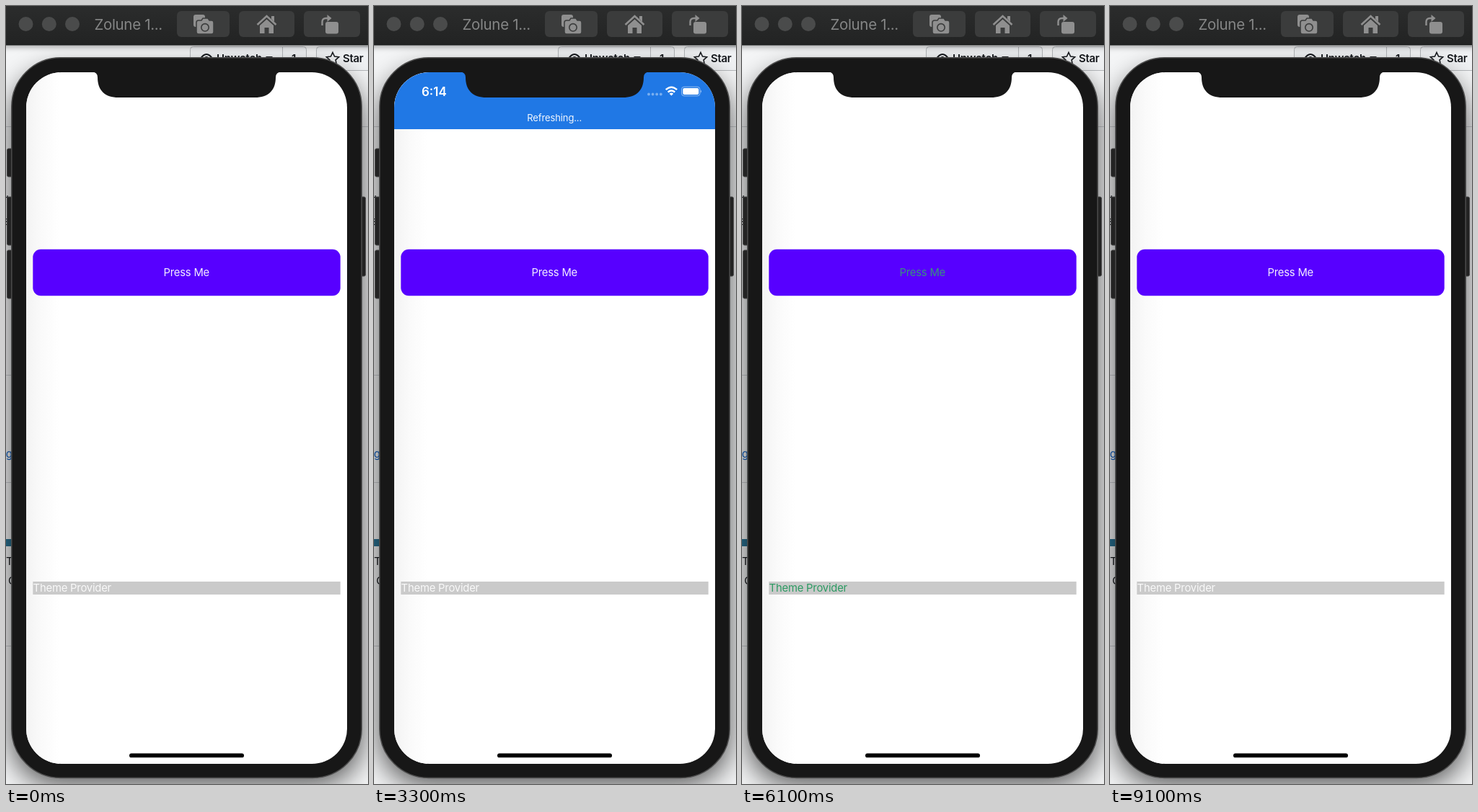
Animation, 502 px wide and 1080 px high, one loop 9.2 s. Source, as an HTML page:

```html
<!DOCTYPE html>
<html lang="en">
<head>
<meta charset="utf-8">
<title>Theme switch</title>
<style>
  html, body { margin: 0; width: 100%; height: 100%; overflow: hidden; background: #fff; }
  svg { display: block; width: 502px; height: 1080px; font-family: Inter, Roboto, sans-serif; }
  .page { font-size: 15px; fill: #15181c; }
  .label { font-size: 14.8px; letter-spacing: -.2px; }
  .icon { fill: #8f8f8f; }
  .key { fill: #232323; stroke: #454545; }
</style>
</head>
<body>
<svg viewBox="0 0 502 1080">
  <defs>
    <linearGradient id="bar" x2="0" y2="1">
      <stop stop-color="#2b2c2c"/><stop offset="1" stop-color="#222323"/>
    </linearGradient>
    <linearGradient id="shade">
      <stop stop-color="#f3f3f3"/><stop offset=".45" stop-color="#fafafa"/><stop offset="1" stop-color="#fff"/>
    </linearGradient>
    <filter id="blur" x="-20%" y="-20%" width="140%" height="140%"><feGaussianBlur stdDeviation="19"/></filter>
    <filter id="soft" x="-10%" y="-50%" width="120%" height="200%"><feGaussianBlur stdDeviation="5"/></filter>
    <clipPath id="screen"><rect x="28" y="92" width="445" height="960" rx="49"/></clipPath>
  </defs>

  <!-- page behind the simulator -->
  <rect width="502" height="1080" fill="#f4f5f6"/>
  <path d="M0 167.5H502M0 512.5H10M0 661.5H10M0 888.5H10" stroke="#c9ccd0"/>
  <g class="page">
    <rect x="255.5" y="56.5" width="161" height="33" rx="4" fill="#eff1f3" stroke="#b4b7ba"/>
    <path d="M383.5 57V90" stroke="#b4b7ba"/>
    <rect x="430.5" y="56.5" width="90" height="33" rx="4" fill="#eff1f3" stroke="#b4b7ba"/>
    <path d="M269 74q9-14 18 0" fill="none" stroke="#15181c" stroke-width="2"/>
    <circle cx="278" cy="73" r="3"/>
    <g font-weight="600">
      <text x="292" y="78" letter-spacing="-.2">Unwatch</text>
      <path d="M360 70h10l-5 5z"/>
      <text x="396" y="78">1</text>
      <text x="467" y="78" letter-spacing="-.3">Star</text>
    </g>
    <path d="M453 64.500l2.600 5.600 6 .7-4.500 4.100 1.200 6-5.300-3-5.300 3 1.200-6-4.500-4.100 6-.7z" fill="none" stroke="#15181c" stroke-width="1.600"/>
    <text x="5" y="274" text-anchor="end">t</text>
    <text x="5" y="304" text-anchor="end">s</text>
    <text x="9" y="627" text-anchor="end" fill="#1261c4">g</text>
    <rect y="740" width="10" height="10" fill="#2a7394"/>
    <text x="0" y="776">T</text>
    <text x="3" y="803">C</text>
  </g>

  <!-- shadows and title bar -->
  <rect x="7" y="92" width="487" height="990" rx="66" fill="#000" opacity=".66" filter="url(#blur)"/>
  <rect x="-10" y="0" width="522" height="56" fill="#000" opacity=".4" filter="url(#soft)"/>
  <rect width="502" height="54" fill="url(#bar)"/>
  <path d="M0 54H502" stroke="#151616"/>
  <g fill="#4a4b4b">
    <circle cx="27.500" cy="25" r="10"/><circle cx="59.800" cy="25" r="10"/><circle cx="92" cy="25" r="10"/>
  </g>
  <text x="122.500" y="33" font-size="20.500" letter-spacing="-.35" fill="#858686">Zolune 1...</text>
  <g fill="#3b3c3c">
    <rect x="237" y="7" width="73" height="36" rx="6"/>
    <rect x="323" y="7" width="77" height="36" rx="6"/>
    <rect x="413" y="7" width="78" height="36" rx="6"/>
  </g>
  <g class="icon">
    <path d="M263 12h10q3 0 3 3v14h-13q-3 0-3-3V15q0-3 3-3z"/>
    <path d="M267 20h4l2-3h7l2 3h3q3 0 3 3v13q0 3-3 3h-18q-3 0-3-3v-13q0-3 3-3z" stroke="#3b3c3c" stroke-width="1.500"/>
    <circle cx="276" cy="29.800" r="5.200" fill="none" stroke="#3b3c3c" stroke-width="1.600"/>
    <path d="M348.500 26L361.500 14 374.500 26" fill="none" stroke="#8f8f8f" stroke-width="2.600"/>
    <path d="M368 14h4v8l-4-4z"/>
    <path d="M352 27l9.500-8.500L371 27v11h-6.500v-8h-6v8H352z"/>
    <rect x="443" y="22" width="18" height="16.500" rx="3"/>
    <path d="M438.500 27v-5q0-5 5-5h3" fill="none" stroke="#8f8f8f" stroke-width="2.400"/>
    <path d="M445.500 12l6 5-6 5z"/>
  </g>

  <!-- device -->
  <g class="key">
    <rect x="1.500" y="198" width="12" height="39" rx="2"/>
    <rect x="1.500" y="265" width="12" height="67" rx="2"/>
    <rect x="1.500" y="339" width="12" height="67" rx="2"/>
    <rect x="486" y="265" width="12.500" height="110" rx="2"/>
  </g>
  <rect x="7.800" y="71.800" width="485.400" height="999.700" rx="68" fill="#171717" stroke="#4c4c4c" stroke-width="1.500"/>

  <g clip-path="url(#screen)">
    <rect x="28" y="92" width="445" height="960" fill="#fff"/>
    <rect x="28" y="92" width="46" height="960" fill="url(#shade)"/>
    <rect x="37.300" y="337.700" width="426.400" height="64.500" rx="11" fill="#5700ff"/>
    <text id="press" class="label" x="250.200" y="375" text-anchor="middle">Press Me</text>
    <rect x="37.300" y="799" width="426.400" height="18" fill="#cacaca"/>
    <text id="theme" class="label" x="37.600" y="813.300">Theme Provider</text>

    <g id="banner">
      <rect x="28" y="92" width="445" height="79" fill="#2078e5"/>
      <text x="250.200" y="160" text-anchor="middle" font-size="13" letter-spacing="-.12" fill="#f4f8fe">Refreshing...</text>
    </g>
    <g id="status" fill="#fff">
      <text x="66" y="124.600" font-size="17" font-weight="600">6:14</text>
      <g opacity=".4">
        <circle cx="381" cy="122.500" r="1.900"/><circle cx="386.600" cy="122.500" r="1.900"/>
        <circle cx="392.200" cy="122.500" r="1.900"/><circle cx="397.800" cy="122.500" r="1.900"/>
      </g>
      <path d="M404.700 116.200q7.700-7 15.400 0M407.600 119.500q4.800-4.200 9.600 0" fill="none" stroke="#fff" stroke-width="2.400"/>
      <path d="M409.600 121.800q2.800-2.400 5.600 0l-2.800 2.800z"/>
      <rect x="426.500" y="112.200" width="25.500" height="12.600" rx="3.500" fill="none" stroke="#fff" stroke-opacity=".5"/>
      <rect x="428.300" y="114" width="22" height="9" rx="2"/>
      <path d="M453 116.500q2 2 0 4z" opacity=".6"/>
    </g>
  </g>
  <path d="M119 91q8 1 8 8c0 18 10 28 29 28H345c19 0 29-10 29-28q0-7 8-8z" fill="#171717"/>
  <rect x="171" y="1037.500" width="159" height="5.800" rx="2.900" fill="#000"/>
</svg>
<script>
  const LOOP = 9200, STEP = 100, HEIGHT = 79, SLIDE = 250;
  // Each refresh shows the banner at once, swaps the theme, then slides the banner away.
  const refreshes = [
    { show: 3300, swap: 3600, hide: 3866, green: true },
    { show: 7300, swap: 7600, hide: 7882, green: false }
  ];
  const [press, theme, banner, status] =
    ["press", "theme", "banner", "status"].map(id => document.getElementById(id));
  const clamp = x => Math.min(1, Math.max(0, x));
  const ease = x => x * x * (3 - 2 * x);

  function draw(t) {
    let green = false, slide = 1;
    for (const r of refreshes) {
      if (t >= r.swap) green = r.green;
      if (t >= r.show) slide = ease(clamp((t - r.hide) / SLIDE));
    }
    press.setAttribute("fill", green ? "#39917f" : "#f3edff");
    theme.setAttribute("fill", green ? "#2c9a62" : "#f9f9f9");
    banner.setAttribute("transform", `translate(0 ${-HEIGHT * slide})`);
    const visible = slide < 1 ? "visible" : "hidden";
    banner.setAttribute("visibility", visible);
    status.setAttribute("visibility", visible);
  }

  const start = performance.now();
  function tick() {
    const t = (performance.now() - start + 1) % LOOP;
    draw(Math.floor(t / STEP) * STEP);
    requestAnimationFrame(tick);
  }
  tick();
</script>
</body>
</html>
```
